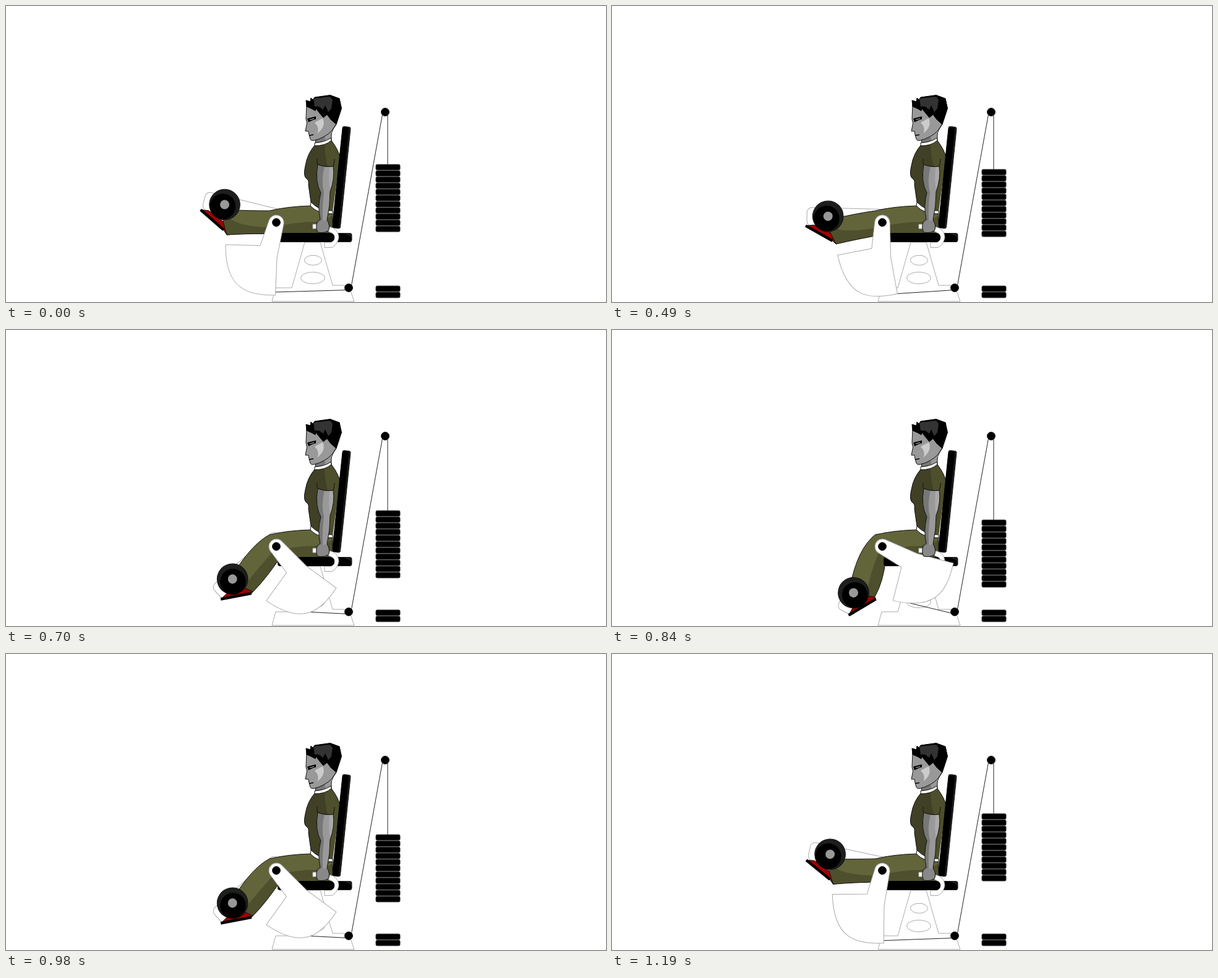
Write an HTML page with a canvas that moves like this. It is 970 by 480 pixels and loops after 1.61 s.

```html
<!DOCTYPE html>
<html>
<head>
<meta charset="utf-8">
<title>Leg curl machine</title>
<style>
html, body { margin: 0; width: 970px; height: 480px; overflow: hidden; background: #fff; }
canvas { display: block; }
</style>
</head>
<body>
<canvas id="stage" width="970" height="480"></canvas>
<script>
const ctx = document.getElementById('stage').getContext('2d');
const TICK = 70, TICKS = 23, START = 6, PEAK = 12, HOLD = 17;
const PIVOT = [437, 351];
const GRAY = '#aaa', LIGHT = '#62643a', OLIVE = '#4e4f2c', DARK = '#3f4025';
const RAD = Math.PI / 180;

// Lever angle in degrees: rest, eased swing down, the same way back, hold.
function angleAt(now) {
  const tick = Math.floor(now / TICK) % TICKS;
  if (tick < START) return 0;
  const n = tick < HOLD ? PEAK - START - Math.abs(tick - PEAK) : 0;
  return 1.85 + 8.75 * n + 2.29 * n ** 2 - 0.275 * n ** 3;
}

function shape(d, fill, stroke, width = 1) {
  const path = new Path2D(d);
  if (fill) { ctx.fillStyle = fill; ctx.fill(path); }
  if (stroke) { ctx.strokeStyle = stroke; ctx.lineWidth = width; ctx.stroke(path); }
}

function oval(x, y, rx, ry, fill, stroke) {
  shape(`M${x - rx},${y}a${rx},${ry} 0 1 1 ${2 * rx},0a${rx},${ry} 0 1 1 ${-2 * rx},0Z`, fill, stroke);
}

function box(x, y, w, h, r, fill, stroke) {
  ctx.beginPath();
  ctx.roundRect(x, y, w, h, r);
  ctx.fillStyle = fill;
  ctx.fill();
  ctx.strokeStyle = stroke;
  ctx.lineWidth = 1;
  ctx.stroke();
}

function turned([x, y], degrees, paint) {
  ctx.save();
  ctx.translate(x, y);
  ctx.rotate(degrees * RAD);
  paint();
  ctx.restore();
}

const knob = (x, y) => oval(x, y, 6.5, 6.5, '#000', '#222');

function drawBase(angle) {
  shape('M430,479L436,457H462L483,383H508L528,453H554L563,479Z', '#fff', GRAY);
  oval(496.5, 412.3, 14, 8, '#fff', GRAY);
  oval(496, 441, 19.5, 9.5, '#fff', GRAY);
  // Cable running from the cam to the lower pulley.
  const x = Math.min(472, 432 + 0.7 * angle);
  const rise = 2.6 + 0.36 * angle - 0.0087 * angle ** 2;
  shape(`M${x},${460.5 + rise * (554 - x) / 89}L554,460.5`, null, '#222');
}

function drawStack(angle) {
  const top = 257 + Math.ceil(angle * (0.58 + 0.00095 * angle));
  shape(`M608.5,176L558.5,453M617,175V${top}`, null, '#222');
  const bar = y => box(598, y, 39, 9, 2, '#000', '#333');
  for (let i = 0; i < 11; i++) bar(top + 10 * i);
  bar(454);
  bar(464);
  knob(613, 172);
  knob(554, 457);
}

function drawBackrest() {
  turned([542.3, 278], 5.9, () => {
    box(-6.5, -82.5, 13, 165, 3, '#1d1f1d', '#111');
    box(-6, -81, 9.5, 163, 3, '#000', '#000');
  });
}

function drawTorso() {
  shape('M500,216L526,203V219Q515,226 500,224Z', '#777');
  shape('M515,210L526,203V219L517,223Z', '#999');
  shape('M534,192Q526,203 526,209V218M500.5,217V224', null, '#111');
  const front = 'L489,290Q490,282 486,280Q480,276 484,259Q487,240 499,226';
  shape(`M499,226Q516,227 526,218Q538,234 540,246L528,334Q508,334 493,318${front}Z`, OLIVE);
  shape(`M499,226Q509,227 515,225Q515,243 521,260L510,330Q500,326 493,318${front}Z`, DARK);
  shape(`M526,218Q538,234 540,246M493,318${front}`, null, '#111');
  shape('M499,222Q515,221 525,214L526,218Q516,227 499,226.5Z', '#fff', '#111');
}

function drawHead() {
  shape('M486,160L485,183L486.5,190L484,203H489L490,209L492,216Q493,219 498,218Q515,214 527,202L534,191L520,165Z', '#999', '#111');
  shape('M499,189L512,182Q518,195 503,207Q508,198 499,189Z', '#ccc');
  shape('M485,153L492,155L493,149L496,152L499,148L524,144.5L539,150L542.5,166L534,192L525,184L519,176L513,181L504,170L501,166L500,170L495,167L486,163Z', '#000', '#000');
  shape('M497,150L524,147L528,152L526,166L521,172L516,161L513,168L506,163L499,163Z', '#333');
  shape('M487,182.5L501,179V183.5L496,185L489,188.5Z', '#000');
  shape('M491,184.5L498,182.5', null, '#ccc');
  shape('M490,210L497,208.8', null, '#000', 1.5);
}

function drawLeg(angle) {
  // A point circling the knee, following the lever at its own rate.
  const orbit = (radius, start, rate) => {
    const a = (start + rate * angle) * RAD;
    return [PIVOT[0] - radius * Math.cos(a), PIVOT[1] + radius * Math.sin(a)];
  };
  const toe = orbit(124, -9.5, 0.95);
  const sole = orbit(86, 8, 0.97);
  const ankle = orbit(86, -1, 0.9);
  const heel = orbit(82.5, 14.2, 0.87);
  const calf = `L443,369.5Q${orbit(58, 18, 0.95)} ${heel}L${ankle}`;
  const outline = `M492,324Q455,325 426,332Q${orbit(40, -28, 0.4)} ${orbit(85, -14, 0.85)}`
    + `L${ankle}L${heel}Q${orbit(58, 18, 0.95)} 443,369.5L528,369V337Q505,338 492,324Z`;

  shape(`M${toe}L${orbit(111, -10, 0.96)}L${ankle}L${heel}L${sole}Z`, '#a00000', '#111');
  shape(`M${toe}L${sole}`, null, '#000', 4.5);
  shape(outline, LIGHT);
  shape(`M${orbit(79, -6, 1.02)}Q${orbit(58, 8, 0.75)} 432,359Q470,349 510,350L528,340V369${calf}Z`, OLIVE);
  shape(outline, null, '#111');
  shape('M493,318Q507,333 528,332V337Q505,338 492,324Z', '#fff', '#111');
}

function drawSeat() {
  box(439.5, 368.5, 119.5, 14, 3, '#000', '#222');
  shape('M546,369H556Q558.5,370 558.5,377L555,372Z', '#1d1f1d');
  shape('M520,358Q537,359 538,375Q536,387 527,391.5H515V383H525Q531,380 531,374Q530,369 522,366Z', '#fff', GRAY);
  box(440, 368.5, 90.5, 14, [3, 6, 6, 3], '#000', '#000');
  box(496, 354, 8, 7, 0, '#fff', GRAY);
}

function drawArm() {
  const inner = 'L504,367Q500,360 503,350L508,346Q503,325 509,303Q499,285 504,257Z';
  const arm = `M504,257Q517,262 529,259Q532,280 524,301Q524,325 519,347Q524,355 522,363Q517,369 504,367${inner}`;
  const cuff = 'M503,248Q502,254 504,257Q517,262 529,260Q531,255 531,248';
  shape(arm, '#999');
  shape(`M504,257L515,260Q509,283 514,303Q511,325 512,346${inner}`, '#777');
  shape('M523,260L529,259Q531,280 524,300Q521,285 523,260Z', '#aaa');
  shape('M504,352L509,348L519,348Q524,355 522,363Q517,368 504,367Q501,360 504,352Z', '#888');
  shape(arm, null, '#111');
  shape(`${cuff}L521,240H508Z`, OLIVE);
  shape('M503,248L508,240H516Q517,250 520,260Q510,260 504,257Z', DARK);
  shape(cuff, null, '#111');
}

function drawLever() {
  oval(-83.5, -29, 24.8, 24.8, '#1d1f1d', '#111');
  oval(-86.5, -26, 20.8, 20.8, '#000');
  oval(-83.5, -29, 7.5, 7.5, '#999');
  shape('M-82,36L-26,37.5L-11.5,-4A12.2,12.2 0 0 1 12,2L1,58L-1.5,118C-50,118 -82,106 -82,36Z', '#fff', GRAY);
}

function draw(angle) {
  ctx.fillStyle = '#fff';
  ctx.fillRect(0, 0, 970, 480);
  drawBase(angle);
  drawStack(angle);
  turned(PIVOT, 14 - angle, () => box(-122, -21.5, 137, 30, 8, '#fff', GRAY));
  drawTorso();
  drawBackrest();
  drawHead();
  drawLeg(angle);
  drawSeat();
  turned(PIVOT, -angle, drawLever);
  knob(...PIVOT);
  drawArm();
}

function frame() {
  draw(angleAt(performance.now() - start));
  requestAnimationFrame(frame);
}
const start = performance.now();
frame();
</script>
</body>
</html>
```
